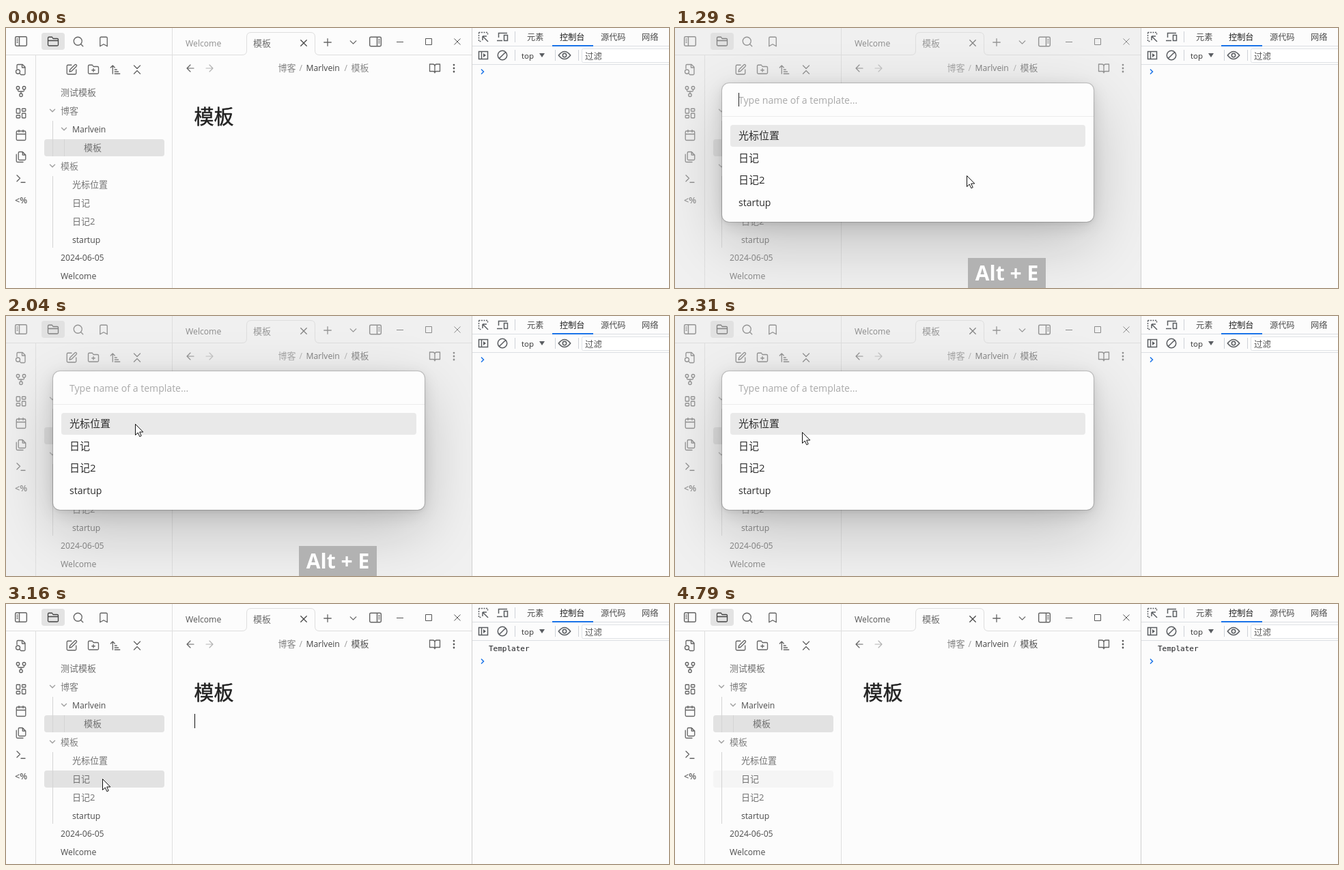
Animation, 971 px wide and 381 px high, one loop 5.19 s. Source, as an HTML page:

```html
<!DOCTYPE html>
<html lang="zh-CN">
<head>
<meta charset="utf-8">
<title>模板</title>
<style>
html, body { margin: 0; width: 100%; height: 100%; overflow: hidden; background: #fcfcfc; }
#stage { position: relative; width: 971px; height: 381px; overflow: hidden; }
svg { position: absolute; left: 0; top: 0; display: block; }
text { font-family: "Open Sans", "Noto Sans CJK SC", "Noto Sans CJK", sans-serif; white-space: pre; }
.mono { font-family: "DejaVu Sans Mono", monospace; }
#app, #dialog, #cover { position: absolute; left: 0; top: 0; width: 682px; height: 381px; overflow: hidden; }
#cover { background: rgba(220, 220, 220, .4); }
#panel {
  position: absolute; left: 69px; top: 81px; width: 544px; height: 203px;
  border-radius: 10px; background: #fdfdfd;
  box-shadow: 0 0 0 1px rgba(0, 0, 0, .17), 0 1.8px 7.3px rgba(0, 0, 0, .07),
    0 6.3px 24.7px rgba(0, 0, 0, .11), 0 30px 90px rgba(0, 0, 0, .2);
}
</style>
</head>
<body>
<div id="stage">
  <div id="app"></div>
  <div id="dialog"><div id="cover"></div><div id="panel"></div></div>
</div>
<script>
const LOOP = 5190;
const $ = id => document.getElementById(id);
const isCjk = s => /[\u4e00-\u9fff]/.test(s);

// Latin letters are set a little smaller than Chinese ones at the same nominal size
function text(x, cy, s, color = '#5a5a5a', size = 13, extra = '') {
  const px = isCjk(s) ? size : size * .938;
  return `<text x="${x}" y="${Math.round(cy + size * .35)}" font-size="${px}" fill="${color}" ${extra}>${s}</text>`;
}
const rect = (x, y, w, h, fill, r = 0, extra = '') =>
  `<rect x="${x}" y="${y}" width="${w}" height="${h}" rx="${r}" fill="${fill}" ${extra}/>`;
const path = (d, color, w = 1, extra = '') =>
  `<path d="${d}" fill="none" stroke="${color}" stroke-width="${w}" ${extra}/>`;
const icon = (cx, cy, size, d, color = '#646464', w = 1.75) =>
  `<g transform="translate(${cx - size / 2} ${cy - size / 2}) scale(${size / 24})">` +
  path(d, color, w, 'stroke-linecap="round" stroke-linejoin="round"') + '</g>';
const svg = (w, body) => `<svg width="${w}" height="381" viewBox="0 0 ${w} 381">${body}</svg>`;

const circle = (x, y, r) => `M${x - r} ${y}a${r} ${r} 0 1 0 ${2 * r} 0a${r} ${r} 0 1 0 ${-2 * r} 0`;
const box = (x, y, w, h, r = 1) =>
  `M${x + r} ${y}h${w - 2 * r}a${r} ${r} 0 0 1 ${r} ${r}v${h - 2 * r}a${r} ${r} 0 0 1 ${-r} ${r}` +
  `h${2 * r - w}a${r} ${r} 0 0 1 ${-r} ${-r}v${2 * r - h}a${r} ${r} 0 0 1 ${r} ${-r}z`;
const FOLDER = 'M4 20h16a2 2 0 0 0 2-2V8a2 2 0 0 0-2-2h-8l-2-3H4a2 2 0 0 0-2 2v13a2 2 0 0 0 2 2z';
const DOWN = 'M6 9l6 6 6-6';
const CROSS = 'M6 6l12 12M18 6L6 18';
const GREY = '#dedede';

function ribbon() {
  return [
    icon(22, 61, 18, 'M4 10V4a2 2 0 0 1 2-2h9l5 5v13a2 2 0 0 1-2 2h-5M14 2v6h6M9.5 19.5L12 22' + circle(6, 16, 4)),
    icon(22, 93, 18, circle(12, 19, 3) + circle(6, 5, 3) + circle(18, 5, 3) + 'M6 8v2a2 2 0 0 0 2 2h8a2 2 0 0 0 2-2V8M12 12v4'),
    icon(22, 125, 18, box(3, 3, 7, 9) + box(14, 3, 7, 5) + box(14, 12, 7, 9) + box(3, 16, 7, 5)),
    icon(22, 157, 18, box(3, 4, 18, 18, 2) + 'M16 2v4M8 2v4M3 10h18'),
    icon(22, 189, 18, 'M15 2H9a2 2 0 0 0-2 2v12a2 2 0 0 0 2 2h10a2 2 0 0 0 2-2V8zM15 2v6h6M3 7v13a2 2 0 0 0 2 2h11'),
    icon(22, 221, 18, 'M4 17l6-6-6-6M12 19h8'),
    text(22, 252.5, '&lt;%', '#646464', 13.5, 'font-weight="600" text-anchor="middle"')
  ].join('');
}

function sidebar() {
  const names = [[80, '测试模板'], [80, '博客', 1], [97, 'Marlvein', 1], [114, '模板'], [80, '模板', 1],
    [97, '光标位置'], [97, '日记'], [97, '日记2'], [97, 'startup'], [80, '2024-06-05'], [80, 'Welcome']];
  const rows = names.map(([x, s, folder], i) => {
    const y = Math.round(94.3 + 26.9 * i);
    return text(x, y, s, isCjk(s) ? (folder ? '#808080' : '#707070') : '#4c4c4c') +
      (folder ? icon(x - 12, y, 14, DOWN, '#a4a4a4', 2.6) : '');
  }).join('');
  return rect(52, 7, 34, 25, '#e3e3e3', 4) +
    icon(22, 19.5, 20, box(2, 4, 20, 16, 2) + 'M9 4v16M5 8h1M5 11h1M5 14h1') +
    icon(69, 20, 18, FOLDER + 'M2 10h20', '#444') +
    icon(106, 20, 18, circle(11, 11, 8) + 'M21 21l-4.3-4.3') +
    icon(143, 20, 18, 'M19 21l-7-4-7 4V5a2 2 0 0 1 2-2h10a2 2 0 0 1 2 2z') +
    icon(96, 61, 18, 'M12 3H5a2 2 0 0 0-2 2v14a2 2 0 0 0 2 2h14a2 2 0 0 0 2-2v-7M18.4 2.6a2.1 2.1 0 0 1 3 3L12 15l-4 1 1-4z') +
    icon(128, 61, 18, FOLDER + 'M12 10v6M9 13h6') +
    icon(160, 61, 18, 'M3 8l4-4 4 4M7 4v16M11 12h4M11 16h7M11 20h10') +
    icon(192, 61, 18, 'M6 20l6-6 6 6M6 4l6 6 6-6') +
    rect(56, 163, 176, 25, '#e2e2e2', 4) +
    `<rect id="hover" x="56" y="244" width="176" height="25" rx="4"/>` +
    path('M68.5 136V188M85.5 163V188M68.5 217V322', '#d4d4d4') + rows;
}

function editor() {
  const tab = 'M0 39.5H346Q352.5 39.5 352.5 33V13Q352.5 6.5 359 6.5H446Q452.5 6.5 452.5 13V33Q452.5 39.5 459 39.5H682';
  return path(tab, GREY) + path('M43.5 40V381M243.5 0V381', GREY) +
    text(263, 22, 'Welcome', '#8f8f8f', 13, 'id="tab"') +
    text(362, 22, '模板', '#6a6a6a') +
    icon(436, 22, 17, CROSS, '#444') +
    icon(471, 21, 18, 'M5 12h14M12 5v14') +
    icon(508.5, 21, 17, DOWN) +
    icon(541, 20, 20, box(2, 4, 20, 16, 2) + 'M15 4v16M18 8h1M18 11h1M18 14h1') +
    path('M572 20.5H582M614.5 15.5h9v9h-9zM656.5 15.5l9 9M665.5 15.5l-9 9', '#555') +
    icon(270, 59, 17, 'M12 19l-7-7 7-7M19 12H5') +
    icon(298, 59, 17, 'M5 12h14M12 5l7 7-7 7', '#b4b4b4') +
    text(398.5, 58.5, '博客', '#868686') + text(429.5, 58.5, '/', '#999') +
    text(439.5, 58.5, 'Marlvein', '#444') + text(495.5, 58.5, '/', '#999') +
    text(505.5, 58.5, '模板', '#858585', 13, 'id="crumb"') +
    icon(628, 59, 18, 'M2 4h6a4 4 0 0 1 4 4v13a3 3 0 0 0-3-3H2zM22 4h-6a4 4 0 0 0-4 4v13a3 3 0 0 1 3-3h7z') +
    icon(656, 59, 17, circle(12, 5, 1) + circle(12, 12, 1) + circle(12, 19, 1), '#5c5c5c', 2) +
    text(275.5, 131, '模板', '#222', 29, 'font-weight="500" stroke="#222" stroke-width=".5"') +
    rect(276, 161, 1, 21, '#111', 0, 'id="caret"');
}

function dialog() {
  const items = ['光标位置', '日记', '日记2', 'startup'];
  return rect(81, 142, 520, 32, '#e9e9e9', 4, 'id="pick"') +
    path('M69 129.5H613', '#ececec') +
    text(93, 106, 'Type name of a template...', '#a9a9a9', 15) +
    rect(93, 95, 1, 20, '#222', 0, 'id="inputCaret"') +
    items.map((s, i) => text(93, 158 + 32.5 * i, s, '#2c2c2c', 15)).join('');
}

function devtools() {
  const ink = '#5a5d61';
  const tabs = [[763, '元素'], [811, '控制台'], [871, '源代码'], [931, '网络']];
  return rect(683, 0, 288, 381, '#fcfcfc') +
    path('M682.5 0V381', '#cfcfcf') +
    path('M683 26.5H971M683 53.5H971', '#dcdfe3') +
    path('M745.5 5V21M745.5 32V48M804.5 32V48M838.5 32V48', '#ced2d8') +
    rect(800, 25, 60, 2, '#1a73e8') +
    tabs.map(([x, s]) => text(x, 13.5, s, s === '控制台' ? '#1c1c1c' : '#4c4c4c', 12.2)).join('') +
    path('M692.5 6.5h13v4M692.5 6.5v13h4', ink, 1.4, 'stroke-dasharray="2 1.5"') +
    path('M698 12h6M698 12v6M698 12l8 8', ink, 1.5) +
    path('M721.5 14V7.5H734M719 18.5h8M729.5 10.5h5v8h-5z', ink, 1.5) +
    path('M692.5 34.5h13v11h-13zM696.5 34.5v11', ink, 1.5) +
    `<path d="M699 37l4 3-4 3z" fill="${ink}"/>` +
    icon(727, 40, 18, circle(12, 12, 9) + 'M18.4 5.6L5.6 18.4', ink, 2) +
    text(755, 40.5, 'top', '#333', 12.3) +
    `<path d="M781 37h8l-4 6z" fill="${ink}"/>` +
    icon(818, 40, 19, 'M1 12Q12-2 23 12Q12 26 1 12z' + circle(12, 12, 3.4), ink, 2) +
    rect(843.5, 30.5, 140, 20, '#fff', 2, 'stroke="#dfe2e6"') +
    text(848, 41.5, '过滤', '#555', 12.4) +
    `<text id="log" class="mono" x="707" y="69" font-size="11" fill="#202124">Templater</text>` +
    path('M696 60.5l3.5 3.5-3.5 3.5', '#1a73e8', 1.5, 'id="prompt"');
}

function overlay() {
  return `<g id="keys">${rect(429, 337, 114, 44, '#b2b2b2')}` +
    '<text x="486" y="370" font-size="30" font-weight="700" fill="#fff" text-anchor="middle">Alt + E</text></g>' +
    '<g id="arrow"><path d="M.5 .5V16.5L4.2 13L6.8 18.7L9.2 17.6L6.7 12H11.8Z" fill="#fff" stroke="#111"/></g>' +
    '<g id="beam">' + path('M-3 -7.5H-1L0 -6.5L1 -7.5H3M0 -6.5V6.5M-3 7.5H-1L0 6.5L1 7.5H3', '#111', 1.2) + '</g>';
}

$('app').innerHTML = svg(682, sidebar() + ribbon() + editor());
$('dialog').insertAdjacentHTML('beforeend', svg(682, dialog()));
$('stage').insertAdjacentHTML('beforeend', svg(971, devtools() + overlay()));

// Pointer steps: time, x, y, shape
const pointer = [
  [0, 0, 0, ''],
  [70, 653, 336, 'arrow'], [140, 602, 342, 'beam'], [210, 547, 338, 'beam'], [280, 511, 303, 'beam'],
  [350, 482, 266, 'beam'], [420, 454, 239, 'beam'], [490, 434, 221, 'beam'], [560, 429, 217, 'beam'],
  [1290, 427, 216, 'arrow'], [1620, 423, 214, 'arrow'], [1690, 392, 205, 'arrow'], [1760, 334, 188, 'arrow'],
  [1830, 272, 175, 'arrow'], [1900, 222, 165, 'arrow'], [1970, 197, 160, 'arrow'], [2040, 189, 158, 'arrow'],
  [2310, 186, 170, 'arrow'], [2380, 176, 196, 'arrow'], [2450, 161, 225, 'arrow'], [2520, 147, 246, 'arrow'],
  [2650, 141, 254, 'arrow'], [2720, 141, 256, 'arrow'],
  [3360, 163, 260, 'arrow'], [3430, 231, 266, 'arrow'], [3500, 450, 274, 'beam'], [3570, 590, 265, 'beam'],
  [3640, 639, 262, 'arrow'], [3710, 701, 289, 'arrow'], [3780, 745, 321, 'arrow'], [3850, 722, 335, 'arrow'],
  [3920, 652, 360, 'arrow'], [3990, 0, 0, '']
];
const carets = [[490, 960], [3160, 3690], [4260, 4790]];
const inputCarets = [[1290, 1830], [2380, 2920]];

const within = (t, a, b) => t >= a && t < b;
const any = (t, spans) => spans.some(([a, b]) => within(t, a, b));
const show = (id, on) => { $(id).style.display = on ? '' : 'none'; };

function render(t) {
  const [, x, y, shape] = pointer.findLast(step => step[0] <= t);
  for (const id of ['arrow', 'beam']) {
    show(id, shape === id);
    $(id).setAttribute('transform', `translate(${x} ${y})`);
  }
  const focused = t >= 490;
  $('tab').setAttribute('fill', focused ? '#555' : '#8f8f8f');
  $('crumb').setAttribute('fill', focused ? '#555' : '#858585');
  show('caret', any(t, carets));

  show('dialog', within(t, 1290, 3160));
  show('inputCaret', any(t, inputCarets));
  const row = t < 1620 ? 0 : Math.max(0, Math.min(3, Math.floor((y - 142) / 32.4)));
  $('pick').setAttribute('y', 142 + Math.round(32.4 * row));
  show('keys', within(t, 1290, 2240));

  const done = t >= 3160;
  show('hover', done);
  $('hover').setAttribute('fill', t < 3430 ? '#e2e2e2' : '#f5f5f5');
  show('log', done);
  $('prompt').setAttribute('transform', `translate(0 ${done ? 20 : 0})`);
}

const start = performance.now();
function tick() {
  render((performance.now() - start) % LOOP);
  requestAnimationFrame(tick);
}
tick();
</script>
</body>
</html>
```
